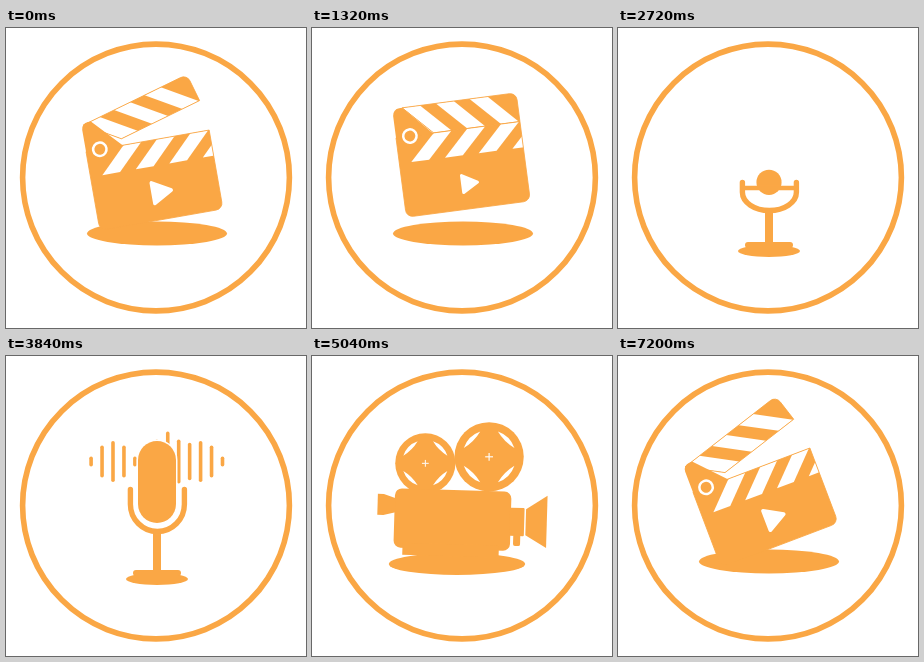
Write an HTML page with a canvas that moves like this. It is 300 by 300 pixels and loops after 7.24 s.

```html
<!DOCTYPE html>
<html lang="en">
<head>
<meta charset="utf-8">
<title>Clapper, microphone, camera</title>
<style>
  html, body { margin: 0; width: 100%; height: 100%; overflow: hidden; background: #fff; }
  canvas { display: block; width: 300px; height: 300px; }
</style>
</head>
<body>
<canvas id="stage"></canvas>
<script>
const LOOP = 7240, STEP = 40;
const ORANGE = '#faa745', WHITE = '#fff';
const canvas = document.getElementById('stage');
const c = canvas.getContext('2d');
const dpr = window.devicePixelRatio || 1;
canvas.width = canvas.height = 300 * dpr;

const clamp = x => Math.min(1, Math.max(0, x));
const ease = (t, from, to) => 0.5 - 0.5 * Math.cos(Math.PI * clamp((t - from) / (to - from)));
const mix = (a, b, p) => a + (b - a) * p;
const rad = deg => deg * Math.PI / 180;

// Goes from 0 to 1 with a damped swing; the first overshoot is 1 + bounce
function spring(t, from, bounce) {
  const x = Math.max(0, t - from) / 208;
  return 1 - bounce ** x * Math.cos(Math.PI * x);
}

function group(draw) {
  c.save();
  draw();
  c.restore();
}

function shape(trace, color = ORANGE) {
  c.fillStyle = color;
  c.beginPath();
  trace();
  c.fill();
}

function line(trace, width, color = ORANGE) {
  c.strokeStyle = color;
  c.lineWidth = width;
  c.beginPath();
  trace();
  c.stroke();
}

function outline(points) {
  points.forEach(p => c.lineTo(...p));
  c.closePath();
}

const poly = (points, color) => shape(() => outline(points), color);
const box = (x, y, w, h, r) => shape(() => c.roundRect(x, y, w, h, r));
const circle = (x, y, r) => c.arc(x, y, r, 0, 2 * Math.PI);

function about(x, y, turn) {
  c.translate(x, y);
  turn();
  c.translate(-x, -y);
}

// The flat ellipse under each object: x, y, rx, ry
const CLAPPER_BASE = [151, 205.5, 70, 12];
const MIC_BASE = [151, 223, 31, 6];
const CAMERA_BASE = [145, 208, 68, 11];

const cameraPop = t => spring(t, 4510, 0.24);

function base(t) {
  const toMic = ease(t, 1700, 2240), toCamera = cameraPop(t), back = ease(t, 6420, 6880);
  const [x, y, rx, ry] = CLAPPER_BASE.map((v, i) => {
    const mic = mix(v, MIC_BASE[i], toMic);
    return mix(mix(mic, CAMERA_BASE[i], toCamera), v, back);
  });
  shape(() => c.ellipse(x, y, rx, ry, 0, 0, 2 * Math.PI));
}

// Slanted white bands; lean is the x shift from top to bottom
function bands(y, h, x0, lean, count) {
  for (let i = 0; i < count; i++) {
    const x = x0 + 34 * i;
    poly([[x, y], [x + 18, y], [x + 18 + lean, y + h], [x + lean, y + h]], WHITE);
  }
}

function striped(trace, drawBands) {
  group(() => {
    shape(trace);
    c.clip();
    drawBands();
  });
  line(trace, 0.8);
}

function clapper(t) {
  const T = t < LOOP / 2 ? t + LOOP : t;
  const size = ease(T, 6680, 6920) * (1 - ease(T, 8800, 9060));
  if (size <= 0) return;
  const swing = 1 - ease(T, 7626, 8000);
  const angle = mix(-7.5, mix(-62, 62, ease(T, 6926, 7626)), swing);
  const arm = -21 * (1 - ease(T, 6916, 7920));
  group(() => {
    c.translate(149.3 + 0.33 * angle * swing, 127 + 11 * swing);
    c.rotate(rad(angle));
    c.scale(size, size);
    c.translate(-62.5, -54.5);
    group(() => {
      about(14, 29, () => c.rotate(rad(arm)));
      striped(() => {
        c.moveTo(38, 29);
        c.lineTo(10, 0);
        c.arcTo(125, 0, 125, 29, 7);
        c.lineTo(125, 29);
        c.closePath();
      }, () => bands(0, 29, 10, 28, 3));
    });
    striped(
      () => c.roundRect(0, 29, 125, 80, [0, 0, 7, 7]),
      () => bands(29, 26, 38, -26, 4)
    );
    // Hinge plate
    shape(() => {
      c.moveTo(0, 30);
      c.arcTo(0, 0, 10, 0, 7);
      c.lineTo(10, 0);
      c.lineTo(38, 30);
    });
    line(() => circle(14, 29, 6.7), 2.5, WHITE);

    c.translate(65, 83.5 - 2 * swing);
    c.scale(1 + 0.22 * swing, 1 + 0.22 * swing);
    const play = () => outline([[-5, -8.5], [-5, 8.5], [10, 0]]);
    c.lineJoin = 'round';
    shape(play, WHITE);
    line(play, 3, WHITE);
  });
}

// Sound bars around a peak that wanders from side to side
function waves(t) {
  const size = ease(t, 3080, 3280) * (1 - ease(t, 3960, 4120));
  if (size <= 0) return;
  const peak = 7.6 + 3 * Math.sin((t - 3840) / 90);
  for (let i = 0; i < 13; i++) {
    const h = size * (10 + 31 * Math.abs(Math.sin(i * Math.PI / 4))
      + 40 * Math.exp(-((i - peak) ** 2)));
    box(83.3 + 10.95 * i, 105.5 - h / 2, 3.6, h, 1.8);
  }
}

function capsule(t) {
  const grow = spring(t, 2680, 0.14);
  if (grow <= 0) return;
  const half = 19 * Math.min(1, Math.sqrt(grow));
  const top = 155 - Math.max(half, 70 * grow ** 2);
  const bottom = 155 + Math.min(12, half);
  const trace = () => c.roundRect(151 - half, top, 2 * half, bottom - top, half);
  line(trace, 3, WHITE);
  shape(trace);
}

function cradle(t) {
  const open = ease(t, 2460, 2660), lift = spring(t, 2720, 0.14);
  if (open <= 0) return;
  const wide = 27 * open;
  const top = mix(185, 154.5, open) - 21 * lift;
  const bottom = 182.5 - 7 * lift;
  const mid = mix(top, bottom, 0.35);
  const left = 151.4 - wide, right = 151.4 + wide;
  c.lineCap = 'round';
  line(() => {
    c.moveTo(right, top);
    c.lineTo(right, mid);
    c.ellipse(151.4, mid, wide, Math.max(0, bottom - mid), 0, 0, Math.PI);
    c.lineTo(left, top);
  }, 5.4);
  if (lift < 0.3) line(() => { c.moveTo(left, 160); c.lineTo(right, 160); }, 4.5);
}

function mic(t) {
  const foot = ease(t, 2200, 2360), leave = ease(t, 4160, 4460);
  if (foot <= 0 || leave >= 1) return;
  waves(t);
  group(() => {
    c.translate(0, 12 * leave);
    about(151, 218, () => c.scale(1 - leave, 1 - leave));
    box(151 - 24 * foot, 220 - 6 * foot, 48 * foot, 6 * foot, 3);
    const stem = mix(216, 182, ease(t, 2300, 2520)) - 7 * spring(t, 2720, 0.14);
    box(147, stem, 8, 218 - stem, 0);
    capsule(t);
    cradle(t);
  });
}

function reel(x, y, r, turn) {
  group(() => {
    c.translate(x, y);
    c.scale(r / 31, r / 31);
    c.rotate(rad(turn));
    shape(() => circle(0, 0, 31));
    for (let i = 0; i < 4; i++) {
      c.rotate(Math.PI / 2);
      line(() => { c.moveTo(0, 0); c.lineTo(3.5, 0); }, 1, WHITE);
      // Crescent slot
      group(() => {
        c.rotate(Math.PI / 4);
        shape(() => {
          c.arc(0, 0, 24, -0.45, 0.45);
          c.quadraticCurveTo(19, 0, 24 * Math.cos(0.45), -24 * Math.sin(0.45));
        }, WHITE);
      });
    }
  });
}

function camera(t) {
  const size = cameraPop(t) * (1 - ease(t, 6420, 6680));
  if (size <= 0) return;
  const loose = 1 - ease(t, 5040, 5340);
  const turn = (t - 5040) * 0.298;
  group(() => {
    about(152, 149, () => c.scale(size, size));
    reel(113.5, 109 - 1.5 * loose, 31 - loose, turn);
    reel(177, 110 - 9 * loose, 31 + 3.5 * loose, turn);

    c.translate(-2.5 * loose, 0);
    about(210, 165, () => c.rotate(rad(1.7 * loose)));
    box(85, 136, 116, 59, 7);
    box(94, 190, 96, 12, 0);
    poly([[68, 142], [74, 142], [86, 146], [86, 160], [74, 163], [68, 163]]);
    box(200, 152, 14.5, 28, 1);
    box(204, 178, 7, 12, 2);
    poly([[216, 153], [237, 139], [237, 191], [216, 179]]);
  });
}

function draw(t) {
  c.setTransform(dpr, 0, 0, dpr, 0, 0);
  c.fillStyle = WHITE;
  c.fillRect(0, 0, 300, 300);
  line(() => circle(150, 149.5, 133.4), 5.6);
  base(t);
  clapper(t);
  mic(t);
  camera(t);
}

function tick() {
  const t = performance.now() % LOOP;
  draw(t < 2 * STEP ? 0 : Math.floor(t / STEP) * STEP);
  requestAnimationFrame(tick);
}
tick();
</script>
</body>
</html>
```
